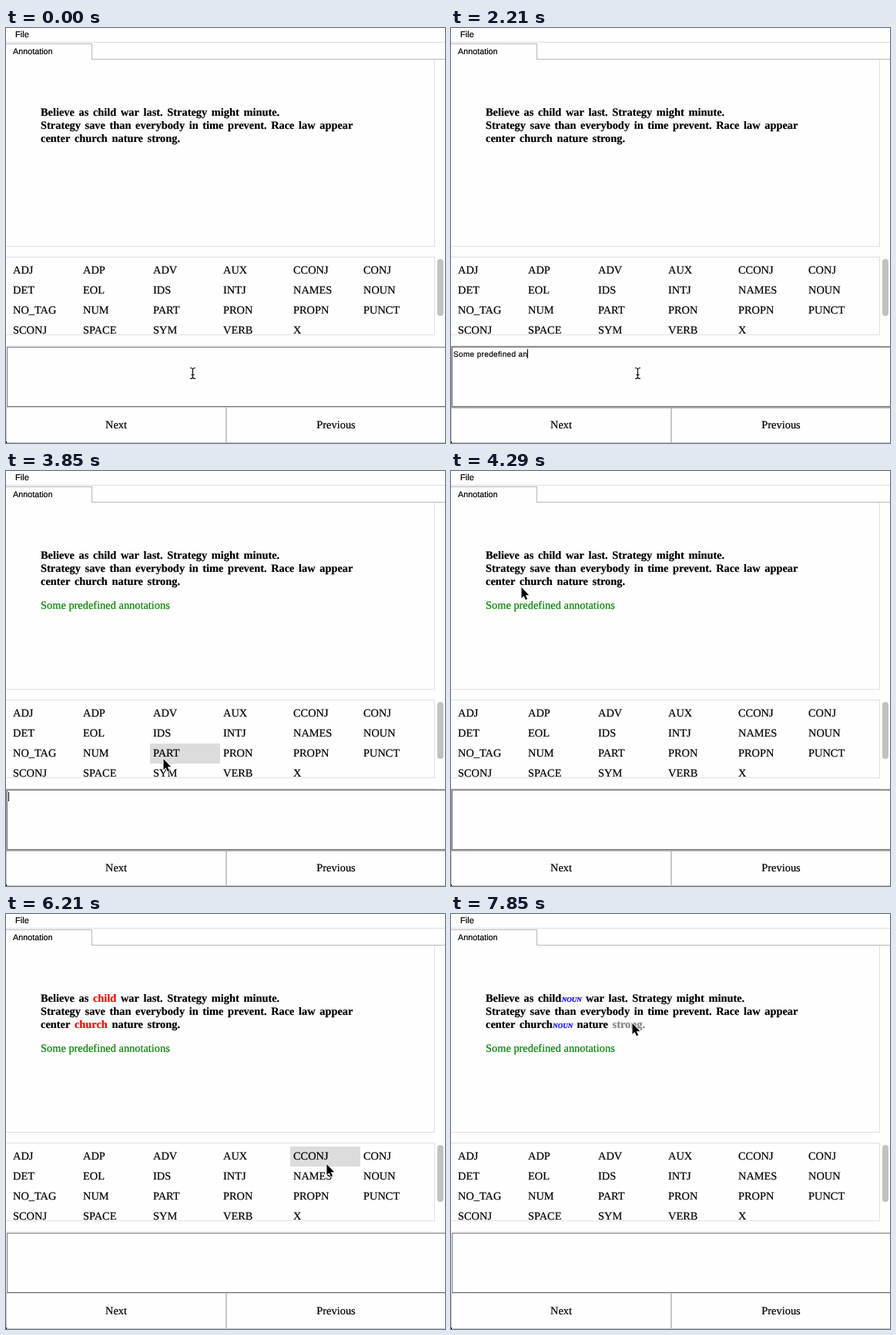
An HTML page with a canvas that plays this animation: 570x539 px, repeating every 8 s.

```html
<!DOCTYPE html>
<html lang="en">
<head>
<meta charset="utf-8">
<title>Annotation</title>
<style>
html, body { margin: 0; width: 100%; height: 100%; overflow: hidden; background: #fefefe; }
canvas { display: block; }
</style>
</head>
<body>
<canvas id="stage" width="570" height="539"></canvas>
<script>
const ctx = document.getElementById('stage').getContext('2d');
ctx.textRendering = 'geometricPrecision';

const LOOP = 8000, STEP = 148;
const SERIF = '"Liberation Serif", serif', SANS = '"Liberation Sans", sans-serif';
const BODY = '14.4px ' + SERIF, BOLD = 'bold ' + BODY, SMALL = 'italic bold 9px ' + SERIF;
const NOTE = 'Some predefined annotations';
const GAP = 5.6;
const LINES = [
  'Believe as child war last. Strategy might minute.',
  'Strategy save than everybody in time prevent. Race law appear',
  'center church nature strong.'
].map(line => line.split(' '));
const TAGS = ('ADJ ADP ADV AUX CCONJ CONJ DET EOL IDS INTJ NAMES NOUN ' +
  'NO_TAG NUM PART PRON PROPN PUNCT SCONJ SPACE SYM VERB X').split(' ');
const FOCUS = 300, NEWLINE = 3400, SUBMIT = 3550, BLUR = 4880, TAGGED = 7100;
const PICKED = { church: BLUR, child: 5470 };

// Stops of the pointer: [time, x, y]
const PATH = [
  [3700, 242, 448], [4290, 91, 150], [BLUR, 105, 146], [5470, 126, 110], [5620, 126, 110],
  [6210, 415, 324], [6800, 472, 338], [7400, 472, 338], [7850, 232, 138]
];
// Bursts of typing: [time, letters]
const TYPING = [[600, 0], [1040, 4], [1190, 8], [1340, 8], [2510, 21], [3100, NOTE.length]];

// Straight-line motion between stops, holding before the first and after the last
function along(stops, t) {
  const next = stops.findIndex(stop => stop[0] > t);
  if (next === 0) return stops[0].slice(1);
  if (next < 0) return stops.at(-1).slice(1);
  const [t0, ...from] = stops[next - 1], [t1, ...to] = stops[next];
  return from.map((v, i) => Math.round(v + (to[i] - v) * (t - t0) / (t1 - t0)));
}

function rect(x, y, w, h, color) {
  ctx.fillStyle = color;
  ctx.fillRect(x, y, w, h);
}

function frame(x, y, w, h, color, weight = 1) {
  ctx.strokeStyle = color;
  ctx.lineWidth = weight;
  ctx.strokeRect(x, y, w, h);
}

// A hairline stroke gives the slightly heavy weight of the lettering
function text(str, x, y, font, color = '#000', align = 'left') {
  ctx.font = font;
  ctx.fillStyle = ctx.strokeStyle = color;
  ctx.lineWidth = 0.2;
  ctx.textAlign = align;
  ctx.fillText(str, x, y);
  ctx.strokeText(str, x, y);
  return ctx.measureText(str).width;
}

function drawTop() {
  text('File', 12, 12, '11.2px ' + SANS);
  rect(0, 18, 570, 1, '#dcdcdc');
  rect(0, 20, 112, 1, '#b8b8b8');
  rect(111, 20, 1, 21, '#b8b8b8');
  rect(111, 40, 459, 1, '#b8b8b8');
  text('Annotation', 9, 34, '10.8px ' + SANS);
  rect(556, 41, 1, 243, '#e0e0e0');
  rect(0, 283, 557, 1, '#e0e0e0');
}

function drawSentence(t, px, py) {
  LINES.forEach((words, row) => {
    let x = 45;
    const base = 114 + row * 17;
    for (const word of words) {
      ctx.font = BOLD;
      const width = ctx.measureText(word).width;
      const hover = px >= x - 1 && px < x + width + 1 && py > base - 14 && py < base + 2;
      const picked = t >= PICKED[word] && t < TAGGED;
      text(word, x, base, BOLD, hover ? '#808080' : picked ? '#f00' : '#000');
      x += width;
      if (word in PICKED && t >= TAGGED) x += text('NOUN', x + 0.5, base, SMALL, '#00f');
      x += GAP;
    }
  });
  if (t >= SUBMIT) text(NOTE, 45, 179, BODY, '#008000');
}

function drawTags(px, py) {
  rect(0, 297, 557, 1, '#e0e0e0');
  rect(556, 297, 1, 102, '#e0e0e0');
  ctx.save();
  ctx.beginPath();
  ctx.rect(0, 298, 556, 100);
  ctx.clip();
  TAGS.forEach((tag, i) => {
    const x = 5 + i % 6 * 91, y = 302 + Math.floor(i / 6) * 26;
    const hover = px >= x && px < x + 91 && py >= y && py < y + 26 && py < 398;
    if (hover) rect(x, y, 91, 26, '#dcdcdc');
    text(tag, x + 4, y + 17, BODY);
  });
  ctx.restore();
  rect(0, 398, 557, 1, '#e0e0e0');
  rect(0, 412, 557, 1, '#e8e8e8');
  ctx.fillStyle = '#c1c1c1';
  ctx.beginPath();
  ctx.roundRect(560, 300, 8, 74, 4);
  ctx.fill();
}

function drawButtons() {
  frame(0.5, 492.5, 285, 46, '#c6c6c6');
  frame(286.5, 492.5, 290, 46, '#c6c6c6');
  text('Next', 143, 520, BODY, '#000', 'center');
  text('Previous', 428.5, 520, BODY, '#000', 'center');
  rect(0, 537, 1, 2, '#000');
}

function drawInput(t) {
  const focused = t >= FOCUS && t < BLUR;
  rect(1, 414, 569, 78, '#fefefe');
  if (focused) frame(1, 414, 580, 79, '#a8a8a8', 2);
  frame(1.5, 414.5, 580, 77, '#767676');
  if (!focused) return;

  const typed = t < SUBMIT ? NOTE.slice(0, along(TYPING, t)[0]) : '';
  ctx.letterSpacing = '0.35px';
  const end = 3 + text(typed, 3, 427, '10px ' + SANS);
  ctx.letterSpacing = '0px';
  const newline = t >= NEWLINE && t < SUBMIT;
  if (t < 4000) rect(newline ? 3 : Math.round(end), newline ? 429 : 417, 1, 12, '#000');
}

function drawPointer(x, y) {
  ctx.save();
  if (y > 414) {
    ctx.translate(x, y);
    const beam = new Path2D('M-3 -6.5Q0 -6.5 .5 -5Q1 -6.5 4 -6.5M.5 -5V6M-3 7.5Q0 7.5 .5 6Q1 7.5 4 7.5M-1.5 2.5H2.5');
    ctx.strokeStyle = '#000';
    ctx.lineWidth = 1.1;
    ctx.stroke(beam);
  } else {
    ctx.translate(x + 0.5, y + 1);
    const arrow = new Path2D('M0 0V14L3.1 11.2L5.4 16.2L7.6 15.2L5.3 10.3H9.7Z');
    ctx.strokeStyle = '#fff';
    ctx.lineWidth = 1.6;
    ctx.stroke(arrow);
    ctx.fillStyle = '#000';
    ctx.fill(arrow);
  }
  ctx.restore();
}

function draw(t) {
  // Pointer and typing advance in even ticks; the offset settles the rounding
  const tick = Math.floor(t / STEP + 0.1) * STEP;
  const [x, y] = along(PATH, tick);
  rect(0, 0, 570, 539, '#fefefe');
  drawTop();
  drawSentence(t, x, y);
  drawTags(x, y);
  drawButtons();
  drawInput(t < NEWLINE ? Math.max(tick, t >= FOCUS ? FOCUS : 0) : t);
  drawPointer(x, y);
}

const start = performance.now();
function loop() {
  draw((performance.now() - start) % LOOP);
  requestAnimationFrame(loop);
}
loop();
</script>
</body>
</html>
```
